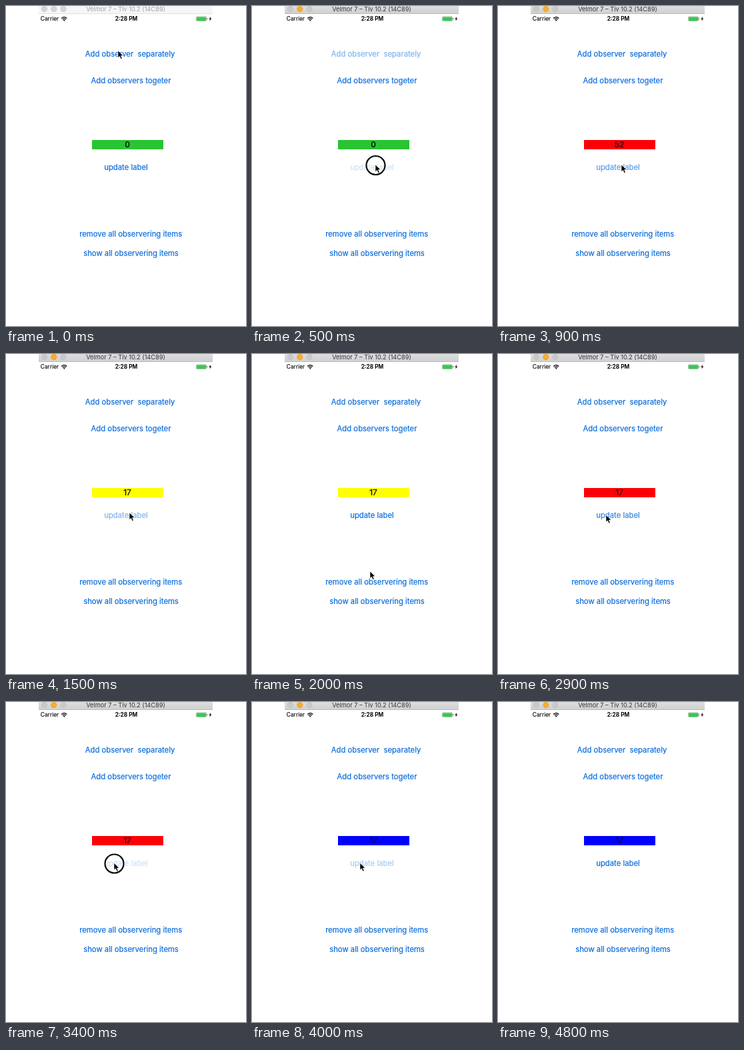
Animation of 360x480 px, one loop 4900 ms. Source, as an HTML page:

```html
<!DOCTYPE html>
<html lang="en">
<head>
<meta charset="utf-8">
<title>Label observer demo</title>
<style>
  html, body { margin: 0; width: 100%; height: 100%; overflow: hidden; background: #fff; }
  svg { display: block; width: 360px; height: 480px; }
  text { font-family: Inter, Roboto, sans-serif; text-anchor: middle; white-space: pre; }
  .button { font-size: 11.3px; fill: #0a6cdc; stroke: #0a6cdc; stroke-width: .2px; }
  .status { font-size: 8.4px; fill: #000; stroke: #000; stroke-width: .1px; }
</style>
</head>
<body>
<svg viewBox="0 0 360 480">
  <defs>
    <linearGradient id="chrome" x2="0" y2="1">
      <stop stop-color="#dedede"/>
      <stop offset="1" stop-color="#d0d0d0"/>
    </linearGradient>
  </defs>

  <rect id="bar" x="49" width="261" height="11"/>
  <path id="edge" d="M49 11.5H310"/>
  <g id="dots" stroke-width=".6">
    <circle cx="57.5" cy="4.5" r="4.2"/>
    <circle cx="71.8" cy="4.5" r="4.2"/>
    <circle cx="86" cy="4.5" r="4.2"/>
  </g>
  <text id="title" x="179.5" y="8" font-size="9.2">Velmor 7 – Tiv 10.2 (14C89)</text>

  <text class="status" x="65.5" y="22.4">Carrier</text>
  <g fill="none" stroke="#000" stroke-width="1.3">
    <path d="M83.2 18.4Q87.3 14.8 91.4 18.4"/>
    <path d="M84.9 20.2Q87.3 18 89.7 20.2"/>
  </g>
  <path d="M85.9 21.3Q87.3 20.2 88.7 21.3L87.3 22.9Z"/>
  <text class="status" x="180.5" y="22.4" font-weight="600">2:28 PM</text>
  <rect x="285.4" y="15.9" width="15.2" height="6.6" rx="1.2" fill="#fff" stroke="#777" stroke-width=".5"/>
  <rect x="286" y="16.5" width="14" height="5.4" rx=".7" fill="#2fce4b"/>
  <path d="M301.4 18v2.4q1-.3 1-1.2t-1-1.2Z" fill="#444"/>
  <path d="M307.2 16l-3 3.6h1.9l-.8 3 3.1-3.8h-1.9Z"/>

  <text class="button" id="single" x="186" y="76.2">Add observer  separately</text>
  <text class="button" x="187.5" y="116.2">Add observers togeter</text>
  <rect id="label" x="129" y="201" width="107" height="14"/>
  <text id="count" x="182" y="212.4" font-size="12" stroke-width=".2"></text>
  <text class="button" id="update" x="180" y="246.2">update label</text>
  <text class="button" id="remove" x="187.2" y="346.2">remove all observering items</text>
  <text class="button" x="187.5" y="375">show all observering items</text>

  <g id="pointer">
    <circle id="ring" cx=".5" cy="1" r="14" fill="none" stroke="#0b0b0b" stroke-width="2.2"/>
    <path d="M0 0V10.6L2.5 8.3L4.3 12.5L6.2 11.7L4.5 7.6H7.8Z" stroke="#fff" stroke-width=".6"/>
  </g>
</svg>

<script>
const LOOP = 4900, STEP = 100, FADE = 500;
const $ = id => document.getElementById(id);

// time, x, y
const path = [
  [0, 168, 67], [300, 168, 67], [500, 185, 238], [1500, 185, 238],
  [2000, 177, 326], [2100, 176, 340], [2200, 176, 340], [2400, 162, 241.5],
  [4000, 162, 241.5], [4300, 270, 15]
];

// button, press, release
const taps = [
  ['single', 100, 300], ['update', 500, 600], ['update', 1200, 1300],
  ['remove', 2100, 2200], ['update', 2400, 2500],
  ['update', 3400, 3500], ['update', 3800, 3900]
];

// time, background, number, ink
const states = [
  [0, '#29c431', 0, '#000'],
  [600, '#fb0007', 52, '#2b0808'],
  [1300, '#ffff00', 17, '#000'],
  [2500, '#fb0007', 17, '#2b0808'],
  [3500, '#29c431', 17, '#000'],
  [3900, '#0000fe', 17, '#080836']
];

const latest = (rows, t) => rows.filter(row => row[0] <= t).pop();

function pointerAt(t) {
  const next = path.findIndex(p => p[0] > t);
  if (next < 0) return path[path.length - 1].slice(1);
  const [t0, x0, y0] = path[next - 1], [t1, x1, y1] = path[next];
  const k = (t - t0) / (t1 - t0);
  return [x0 + (x1 - x0) * k, y0 + (y1 - y0) * k];
}

function opacityAt(name, t) {
  const tap = taps.filter(([id, down]) => id === name && down <= t).pop();
  if (!tap) return 1;
  return Math.min(1, 0.2 + 0.8 * Math.max(0, t - tap[2]) / FADE);
}

function drawWindow(active) {
  $('bar').setAttribute('fill', active ? 'url(#chrome)' : '#f6f6f6');
  $('edge').setAttribute('stroke', active ? '#bdbdbd' : '#e2e2e2');
  $('title').setAttribute('fill', active ? '#333' : '#a0a0a0');
  [...$('dots').children].forEach((dot, i) => {
    const lit = active && i === 1;
    dot.setAttribute('fill', lit ? '#fdab2b' : active ? '#c9c9c9' : '#d6d6d6');
    dot.setAttribute('stroke', lit ? '#df9526' : '#bababa');
  });
}

function draw(t) {
  drawWindow(t >= 200);

  const [, fill, number, ink] = latest(states, t);
  $('label').setAttribute('fill', fill);
  $('count').textContent = number;
  $('count').setAttribute('fill', ink);
  $('count').setAttribute('stroke', ink);

  for (const id of ['single', 'update', 'remove'])
    $(id).setAttribute('opacity', opacityAt(id, t));

  const pressed = taps.some(([, down, up]) => t >= down && t < up);
  $('ring').setAttribute('visibility', pressed ? 'inherit' : 'hidden');
  $('pointer').setAttribute('visibility', t < 4400 ? 'visible' : 'hidden');
  $('pointer').setAttribute('transform', `translate(${pointerAt(t)})`);
}

const start = performance.now();
function tick() {
  const t = (performance.now() - start) % LOOP;
  draw(Math.floor(t / STEP) * STEP);
  requestAnimationFrame(tick);
}
tick();
</script>
</body>
</html>
```
